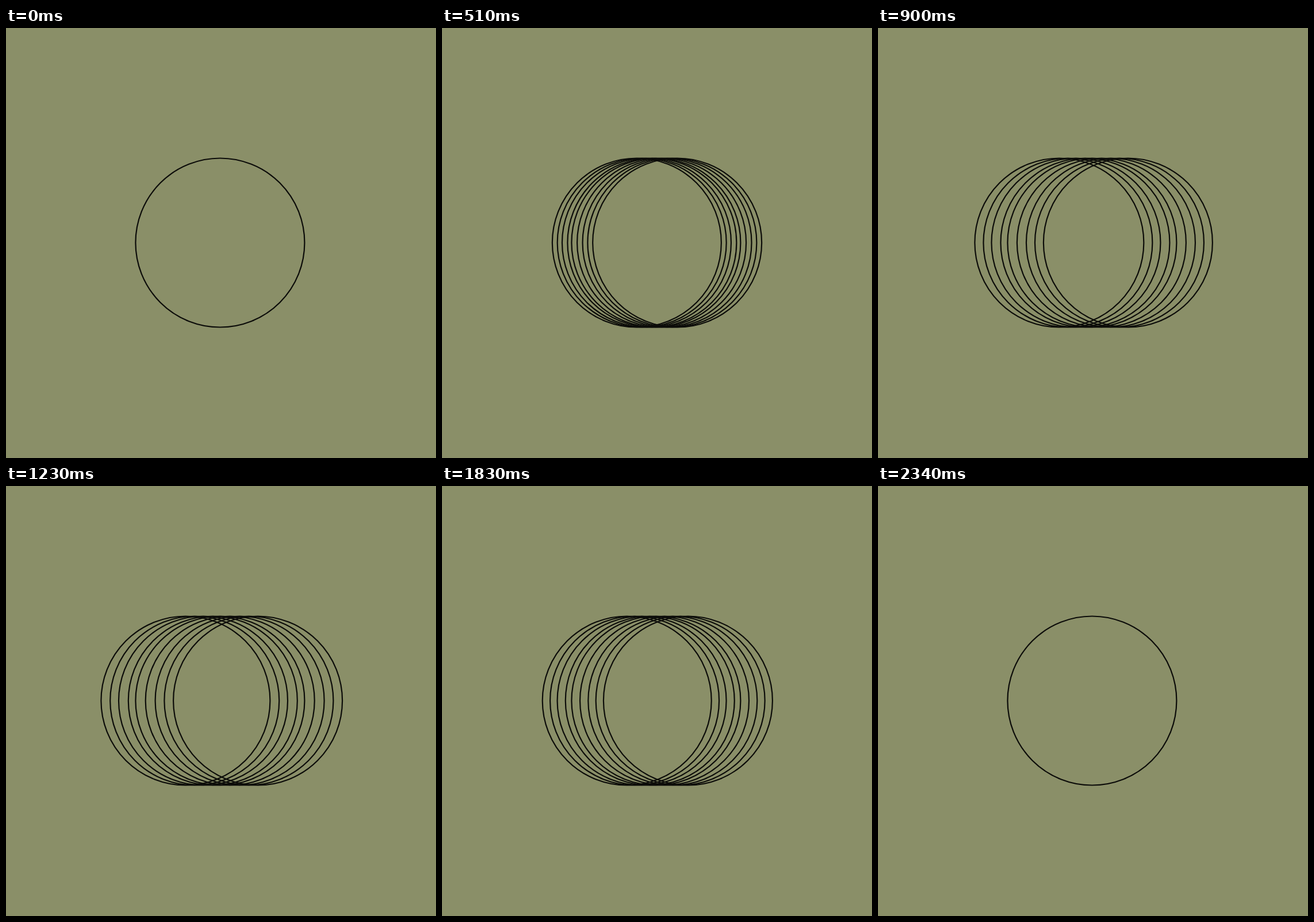
An HTML page for the animation above (2.52 s loop, 748 px wide and 748 px high).

```html
<!DOCTYPE html>
<html lang="en">
<head>
<meta charset="utf-8">
<title>Spreading rings</title>
<style>
  html, body { margin: 0; width: 100%; height: 100%; overflow: hidden; background: #8a8f68; }
  svg { display: block; width: 100vw; height: 100vh; }
  circle { fill: none; stroke: #0c0c09; stroke-width: 2.2; }
</style>
</head>
<body>
<svg id="stage" viewBox="0 0 748 748"></svg>
<script>
const STEP = 30, COUNT = 84;
const CX = 372.4, CY = 373.5, R = 147;
// Horizontal shift of each ring when fully spread
const SPREAD = [-60, -44.2, -29.4, -12.6, 0, 17.3, 34.2, 50, 65.7];
// The fast rise ends at JOIN, then a parabola settles at REST
const START = 5.5, JOIN = 20, REST = 40.3, DECAY = 0.000463;

const settle = n => 1 - DECAY * Math.max(0, REST - n) ** 2;

const bezier = (t, a, b, c, d) => {
  const u = 1 - t;
  return u * u * u * a + 3 * u * u * t * b + 3 * u * t * t * c + t * t * t * d;
};

function rise(n) {
  let lo = 0, hi = 1;
  for (let i = 0; i < 30; i++) {
    const mid = (lo + hi) / 2;
    if (bezier(mid, START, START + 10, JOIN - 3, JOIN) < n) lo = mid;
    else hi = mid;
  }
  const end = settle(JOIN), slope = 2 * DECAY * (REST - JOIN);
  return bezier(lo, 0, 0, end - 3 * slope, end);
}

function progress(n) {
  if (n < 8 || n > 77) return 0;
  const m = Math.min(n, COUNT - 1 - n);
  return m < JOIN ? rise(m) : settle(m);
}

const stage = document.getElementById('stage');
const rings = SPREAD.map(() => {
  const ring = document.createElementNS('http://www.w3.org/2000/svg', 'circle');
  ring.setAttribute('cx', CX);
  ring.setAttribute('cy', CY);
  ring.setAttribute('r', R);
  return stage.appendChild(ring);
});

const begin = performance.now();

function draw() {
  const n = Math.floor((performance.now() - begin) / STEP) % COUNT;
  const p = progress(n);
  rings.forEach((ring, i) => {
    ring.setAttribute('cx', CX + SPREAD[i] * p);
    // At rest a single ring keeps the line thin
    ring.style.display = p || !SPREAD[i] ? '' : 'none';
  });
  requestAnimationFrame(draw);
}
draw();
</script>
</body>
</html>
```
